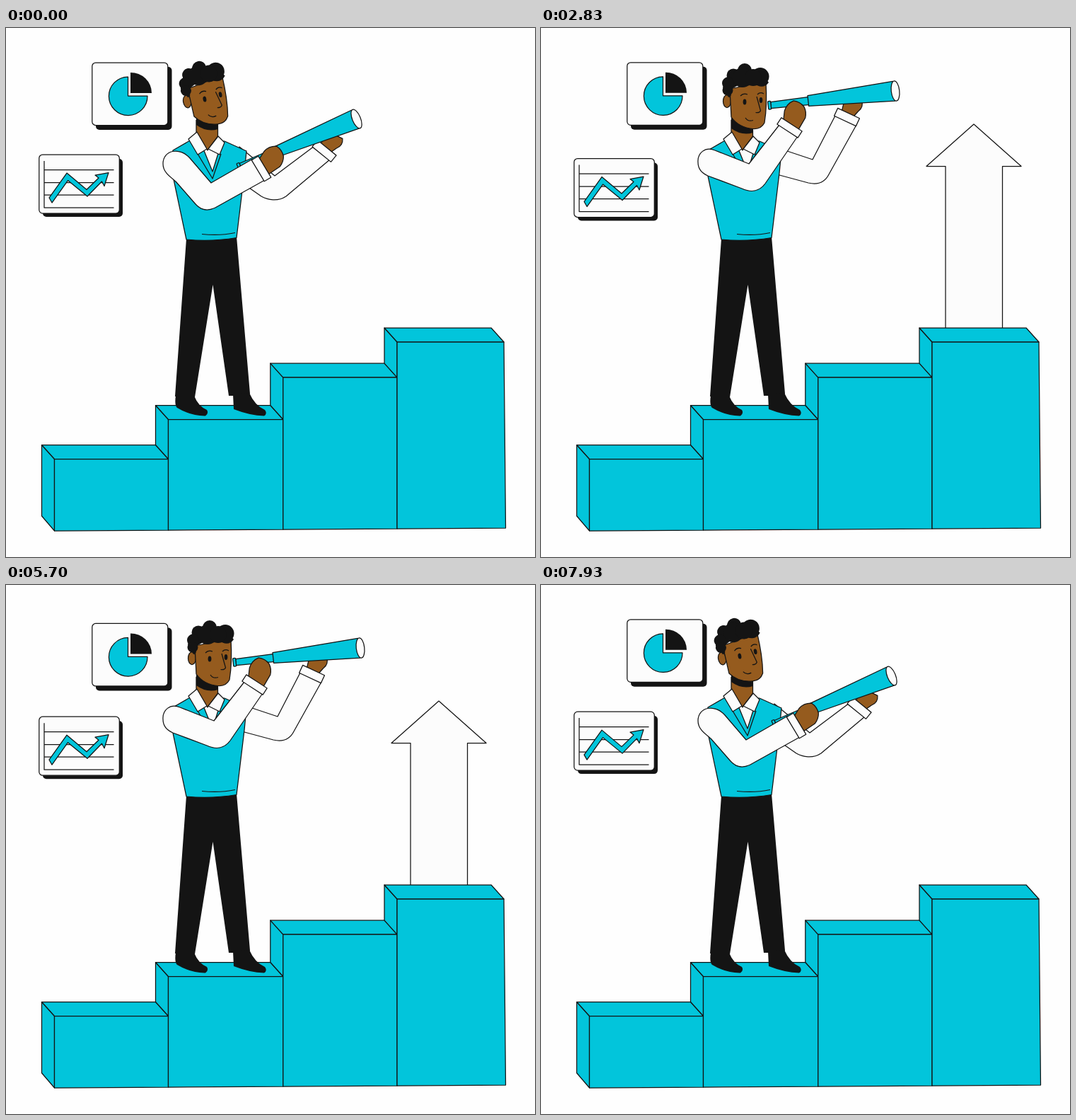
These frames come from a looping animation (748x748 px, 8.01 s). An HTML page:

```html
<!DOCTYPE html>
<html lang="en">
<head>
<meta charset="utf-8">
<title>Looking ahead</title>
<style>
html, body { margin: 0; height: 100%; overflow: hidden; background: #fefefe; }
svg { display: block; width: 100vw; height: 100vh; }
.c { fill: #02c5db; }
.w { fill: #fcfcfc; }
.k { fill: #141414; }
.s { fill: #955b1e; }
.l { fill: none; }
.o, .l, #blocks path { stroke: #141414; stroke-width: 1.25; stroke-linejoin: round; }
</style>
</head>
<body>
<svg viewBox="0 0 748 748">
  <clipPath id="aboveSteps"><path d="M0 0H748V425H0Z"/></clipPath>
  <g clip-path="url(#aboveSteps)">
    <path id="arrow" class="w o" d="M612 136L679 195.500H652.500V440H572V195.500H545Z"/>
  </g>

  <g id="pieCard">
    <rect class="k" x="127" y="6" width="107.500" height="89" rx="5"/>
    <rect class="w o" x="121.800" y="0" width="107" height="88.500" rx="5"/>
    <path class="c o" d="M172.500 47V20A27.300 27.300 0 1 0 200 47Z"/>
    <path class="k" d="M176 43V14A29.500 29 0 0 1 206 43Z"/>
  </g>

  <g id="lineCard">
    <rect class="k" x="52" y="6" width="113" height="82" rx="5"/>
    <rect class="w o" x="46.800" y="0" width="113.500" height="83" rx="5"/>
    <path class="l" d="M54 9V75H152.500M54 21.500H152.500M54 39.500H152.500M54 57H152.500"/>
    <path class="c o" d="M61 61L86 26L114 49.500L131 33L126 29L145 25.500L139 44.500L135.500 38L115 59L87.500 36.500L65 68Z"/>
  </g>

  <g id="blocks" class="c"></g>

  <path id="backSleeve" class="w o"/>
  <g id="backHand">
    <path class="s o" d="M-10 -4L-12 -14L-8 -26L9 -30Q16 -23 11 -14L8 -4Z"/>
    <rect class="w o" x="-17" y="-6" width="34" height="12"/>
  </g>

  <path class="k" d="M255 298Q290 303 326 295L345 517L344 520H315L292.500 363L267 522L239 521Z"/>
  <path class="k" d="M240 520Q238 533 242 537Q262 549 282 548.500Q287 545 284 540Q272 535 266 520ZM321 518L322 539Q345 548 365 548.500Q370 545 366 540Q352 534 344 516Z"/>
  <path class="c o" d="M262 158L236 173L233 195L255 299Q290 302.500 326 296.500L337 205L340 174L309 160Z"/>
  <path class="l" d="M277 291.500Q303 294 324 289.500M271 178L292 213L304 178"/>
  <path class="w o" d="M279 171H302L292 203Z"/>
  <path class="s o" d="M269 130H299.500V153L285 173L269 150Z"/>
  <path id="beard" class="k" d="M269 122H300V143Q284 148 269 137Z"/>
  <path class="w o" d="M270 147L258 157L271 179L284 171ZM300 153L309 162L302 179L286 171Z"/>

  <g id="head">
    <ellipse class="s o" cx="263" cy="103.500" rx="5.500" ry="9"/>
    <path class="s o" d="M267 86L318 76Q320 110 316 134Q311 143.500 300 142.500Q280 141 269 126Z"/>
    <path class="k" d="M257 84L265 98L268.500 96L270 86L282 79Q290 84 300 78Q314 88 322 77L312 64L280 58L262 70Z"/>
    <g id="hair" class="k"></g>
    <ellipse class="k" cx="288" cy="104.500" rx="2.400" ry="4"/>
    <ellipse class="k" cx="311" cy="102" rx="2.300" ry="4"/>
    <path class="l" d="M282 96Q286 91.500 292 94M306 94Q310 90 315 93M305 97L310.500 117Q309 120.500 303.500 119.500M289 127Q293 133 300 130.500"/>
  </g>

  <g id="scope" class="c o">
    <path d="M-177 -4.500L-122 -5.500V5.500L-177 4.500Z"/>
    <rect x="-181" y="-5.700" width="4" height="11.400" rx="1"/>
    <path d="M-124 -7.500L-2 -14V14L-124 7.500Z"/>
    <ellipse class="w" rx="5.800" ry="14.200"/>
  </g>

  <path id="frontHand" class="s o" d="M2 -12L16 -19Q26 -22 35 -16Q39 -8 36 1Q32 8 24 11L4 12Z"/>
  <path id="frontSleeve" class="w o"/>
  <rect id="frontCuff" class="w o" x="-5.500" y="-17.500" width="11" height="35"/>
</svg>
<script>
const $ = id => document.getElementById(id);
const LOOP = 8010, CYCLE = 4000;

// Staircase: [left, top] of each block's back corner
[[50.5, 589.5], [211.5, 533.5], [373.8, 474.2], [535, 424]].forEach(([x, y], i, all) => {
  const last = i === 3, fx = x + 18;
  const nx = last ? 686 : all[i + 1][0];
  const right = nx + 18, base = 711 - i;
  const sideEnd = i ? all[i - 1][1] : 690;
  $('blocks').innerHTML +=
    `<path d="M${x} ${y}L${fx} ${y + 20}V${i ? sideEnd + 20 : base}L${x} ${sideEnd}Z"/>` +
    `<path d="M${x} ${y}H${nx}L${right} ${y + 20}H${fx}Z"/>` +
    `<path d="M${fx} ${y + 20}H${right}L${right + (last ? 2.5 : 0)} ${base - 1}L${fx} ${base}Z"/>`;
});

[[288, 60, 10], [310, 68.5, 12.5], [272, 67, 9.5], [264.5, 78, 8.5],
 [264, 88, 7.5], [285, 70, 14], [300, 70, 12]].forEach(([x, y, r]) => {
  $('hair').innerHTML += `<circle cx="${x}" cy="${y}" r="${r}"/>`;
});

// Arm shapes: lowered, raised
const frontSleeve = [
  'M290 219L260 184C246 168 222 172 222 192C222 203 230 209 240 217L268 249C276 258 286 259 296 254L366 215L349 185Z',
  'M294 192L246 173C232 167 221 177 222 190C222 200 229 206 236 209L284 227C297 233 309 231 317 220L363 153L337 137Z'];
const backSleeve = [
  'M330 168L380 209L436 167L458 186L396 238C384 246 370 243 361 238L328 215Z',
  'M330 168L384 186L416 124L446 137L407 207C401 219 391 222 378 219L326 205Z'];

const mix = (a, b, p) => a + (b - a) * p;
const morph = ([a, b], p) => {
  const to = b.match(/[\d.]+/g);
  let i = 0;
  return a.replace(/[\d.]+/g, n => mix(+n, +to[i++], p).toFixed(2));
};
const ease = (t, from, to) => {
  const p = Math.min(1, Math.max(0, (t - from) / (to - from)));
  return (1 - Math.cos(Math.PI * p)) / 2;
};
const bob = (t, mid, amp, start) => mid - amp * Math.cos(2 * Math.PI * (t - start) / CYCLE);
const move = (id, x, y, turn = 0) =>
  $(id).setAttribute('transform', `translate(${x} ${y}) rotate(${turn})`);

function draw(t) {
  const p = ease(t, 0, 920) - ease(t, 3030, 3950);
  const rise = ease(t, 900, 1900) - ease(t, 2850, 3800);
  const arc = 4 * Math.sin(Math.PI * p);

  move('pieCard', 0, bob(t, 51.2, 3.7, 3400));
  move('lineCard', 0, bob(t, 183, 4, 100));
  move('arrow', 0, 294 * (1 - rise));

  $('head').setAttribute('transform',
    `translate(0 ${-4 * (1 - p)}) rotate(${-10 * (1 - p)} 285 145)`);
  move('beard', 0, 5 * p);
  move('scope', mix(495.5, 501, p), mix(128.5, 89, p), mix(-22.3, -6.5, p));

  $('backSleeve').setAttribute('d', morph(backSleeve, p));
  move('backHand', mix(450, 432.5, p), mix(174, 126, p), mix(39, 25, p));

  $('frontSleeve').setAttribute('d', morph(frontSleeve, p));
  const wrist = [mix(361, 351.5, p) + arc, mix(199, 141, p), mix(-31, -57, p)];
  move('frontHand', ...wrist);
  move('frontCuff', ...wrist);
}

// Twenty steps a second, held for 30 and 70 ms in turn; two cycles per loop
function tick() {
  const e = performance.now() % LOOP;
  const step = Math.min(159, 2 * Math.floor(e / 100) + (e % 100 >= 30 ? 1 : 0));
  draw(step * 50 % CYCLE);
  requestAnimationFrame(tick);
}
tick();
</script>
</body>
</html>
```
